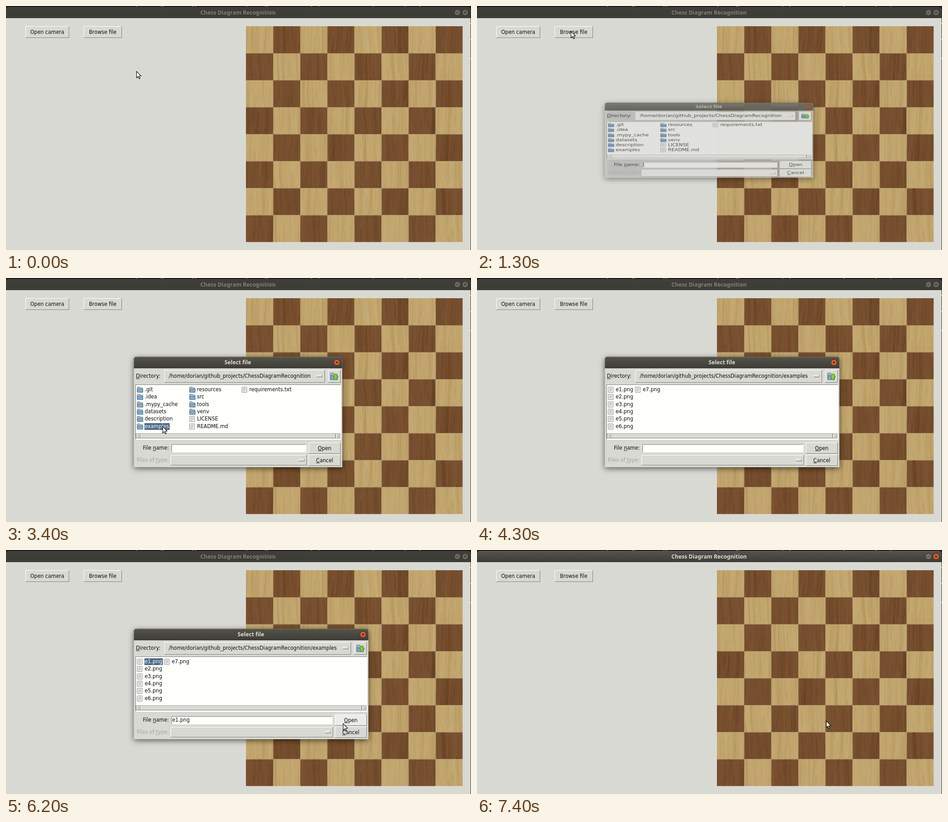
Write an HTML page with a canvas that moves like this. It is 1031 by 543 pixels and loops after 8000 ms.

```html
<!DOCTYPE html>
<html>
<head>
<meta charset="utf-8">
<style>
  html, body { margin: 0; width: 100%; height: 100%; overflow: hidden; background: #d9d9d4; }
  canvas { display: block; }
</style>
</head>
<body>
<canvas id="stage" width="1031" height="543"></canvas>
<script>
const stage = document.getElementById('stage');
const c = stage.getContext('2d');
const FACE = '#d9d9d4', HOVER = '#ececea', WHITE = '#fffffc', DARK = '#7f7f7a', INK = '#0c0c0c';
const TITLE = 'bold 12.2px "Noto Sans", sans-serif';

// Prefer the condensed face; without it a naturally narrow font is used
const CONDENSED = 'condensed 12.4px "DejaVu Sans Condensed", "DejaVu Sans", sans-serif';
c.font = CONDENSED;
const UI = c.measureText('Open camera').width < 79 ? CONDENSED : '11.8px "Noto Sans", sans-serif';

function rect(x, y, w, h, color) { c.fillStyle = color; c.fillRect(x, y, w, h); }

function label(text, x, y, { color = INK, align = 'left', font = UI, mark = -1 } = {}) {
  c.font = font;
  c.fillStyle = color;
  const width = s => c.measureText(s).width;
  if (align === 'center') x -= width(text) / 2;
  if (align === 'right') x -= width(text);
  c.fillText(text, x, y);
  if (mark >= 0) c.fillRect(x + width(text.slice(0, mark)), y + 1.5, width(text[mark]), 1);
}

function line(color, width, ...points) {
  c.strokeStyle = color;
  c.lineWidth = width;
  c.beginPath();
  points.forEach(([x, y]) => c.lineTo(x, y));
  c.stroke();
}

// Bevelled box: raised by default, sunken on request
function bevel(x, y, w, h, fill = FACE, sunken = false) {
  rect(x, y, w, h, sunken ? WHITE : DARK);
  rect(x, y, w - 1, h - 1, sunken ? DARK : WHITE);
  rect(x + 1, y + 1, w - 2, h - 2, fill);
}

function button(text, x, y, w, h, { hover, pressed, mark } = {}) {
  bevel(x, y, w, h, hover || pressed ? HOVER : FACE, pressed);
  const shift = pressed ? 1.5 : 0;
  label(text, x + w / 2 + shift, y + h / 2 + 4 + shift, { align: 'center', mark });
}

function titleBar(text, x, y, w, h, focused) {
  const shade = c.createLinearGradient(0, y, 0, y + h);
  shade.addColorStop(0, focused ? '#55544b' : '#3f4038');
  shade.addColorStop(1, focused ? '#3d3c36' : '#3b3c35');
  c.fillStyle = shade;
  c.beginPath();
  c.roundRect(x, y, w, h, [5, 5, 0, 0]);
  c.fill();
  if (focused) rect(x + 5, y, w - 10, 1, '#66655c');
  label(text, x + w / 2 - .5, y + h / 2 + 4, { color: focused ? '#dfdbd2' : '#827f78', align: 'center', font: TITLE });
}

function windowButton(x, y, fill, glyph, isClose) {
  c.beginPath();
  c.arc(x, y, 6.7, 0, 7);
  c.fillStyle = fill;
  c.fill();
  c.strokeStyle = '#2f2e2a';
  c.lineWidth = 1;
  c.stroke();
  if (isClose) {
    line(glyph, 1.3, [x - 2.3, y - 2.3], [x + 2.3, y + 2.3]);
    line(glyph, 1.3, [x + 2.3, y - 2.3], [x - 2.3, y + 2.3]);
  } else line(glyph, 1.3, [x - 3, y + .2], [x + 3, y + .2]);
}

function makeBoard() {
  const size = 60.06, board = new OffscreenCanvas(481, 481), g = board.getContext('2d');
  let seed = 11;
  const rnd = () => (seed = (seed * 16807) % 2147483647) / 2147483647;
  for (let row = 0; row < 8; row++) for (let col = 0; col < 8; col++) {
    const dark = (row + col) % 2, x = col * size, y = row * size;
    const tones = dark ? ['74,48,26', '140,98,62'] : ['160,128,74', '212,188,138'];
    const lean = (rnd() - .5) * 9, bend = (rnd() - .5) * 6;
    g.save();
    g.beginPath();
    g.rect(x, y, size, size);
    g.clip();
    g.fillStyle = dark ? '#78502f' : '#c2a66e';
    g.fillRect(x, y, 61, 61);
    for (let i = 0; i < 75; i++) {
      const broad = i < 7;
      const sx = x + rnd() * 66 - 3, len = broad ? 70 : 15 + rnd() * 50;
      const sy = broad ? y - 5 : y + rnd() * 80 - 20;
      g.strokeStyle = `rgba(${tones[rnd() < .52 ? 0 : 1]},${broad ? .13 : .08 + rnd() * .2})`;
      g.lineWidth = broad ? 3 + rnd() * 5 : .6 + rnd() * .8;
      g.beginPath();
      g.moveTo(sx, sy);
      g.quadraticCurveTo(sx + bend, sy + len / 2, sx + lean * len / 60, sy + len);
      g.stroke();
    }
    g.restore();
  }
  return board;
}
const board = makeBoard();

function drawMain(t, cursor) {
  const focused = t >= 1100 && t < 1300 || t >= 7300;
  rect(0, 0, 1031, 543, FACE);
  rect(0, 0, 1031, 8, '#2a0a22');
  for (const x of [288, 343, 347, 413, 419, 532, 574, 578, 676, 692, 813, 884, 916]) rect(x, 0, 3, 1, '#aaa2a8');
  titleBar('Chess Diagram Recognition', 0, 2, 1030, 25, focused);
  windowButton(1001, 14.5, focused ? '#77756b' : '#6b6a62', '#3b3a35', false);
  windowButton(1018, 14.5, focused ? '#e45b31' : '#6b6a62', focused ? '#51200f' : '#3b3a35', true);
  rect(1030, 8, 1, 535, '#33262f');
  for (const y of [38, 73, 116]) rect(1030, y, 1, 2, '#ddd');
  button('Open camera', 43, 45, 97, 26);
  button('Browse file', 172, 45, 85, 26, {
    hover: t < 1300 && cursor[0] < 257 && cursor[1] < 70,
    pressed: t >= 1100 && t < 1300
  });
  c.drawImage(board, 532.4, 45.3);
}

function folder(x, y) {
  c.fillStyle = '#77797a';
  c.beginPath();
  c.roundRect(x, y, 7, 6, 1.5);
  c.roundRect(x, y + 2, 13, 10, 1);
  c.fill();
  rect(x + 1, y + 1, 5, 2, '#b4b6b4');
  rect(x + 1, y + 3, 11, 2, '#c4c7c6');
  rect(x + .5, y + 4.5, 13, 8.5, '#41688f');
  rect(x + 1.5, y + 5.5, 11, 6.5, '#83a9cf');
}

function sheet(x, y) {
  c.fillStyle = '#8b8c88';
  c.beginPath();
  c.roundRect(x, y, 12, 13, 1.5);
  c.fill();
  rect(x + 1, y + 1, 10, 11, '#f2f2ef');
  for (let i = 0; i < 4; i++) rect(x + 3, y + 3 + i * 2, i === 3 ? 4 : 6, 1, '#a9aaa6');
}

function upButton(x, y) {
  bevel(x, y, 28, 28);
  c.save();
  c.translate(x + 5, y + 6);
  c.scale(1.2, 1.2);
  folder(0, 0);
  c.restore();
  c.beginPath();
  [[17, 8], [23, 15], [20, 15], [20, 21], [14, 21], [14, 15], [11, 15]].forEach(([px, py]) => c.lineTo(x + px, y + py));
  c.closePath();
  c.fillStyle = '#7fd635';
  c.fill();
  c.strokeStyle = '#397d10';
  c.lineWidth = 1;
  c.stroke();
}

function scrollArrow(x, dir) {
  bevel(x, 347, 9, 10);
  const mid = x + 4.5;
  line('#8e8e89', 1, [mid - dir * 1.5, 349], [mid + dir * 1.5, 352], [mid - dir * 1.5, 355]);
}

const rootFiles = '.git .idea .mypy_cache datasets description examples resources src tools venv LICENSE README.md requirements.txt'.split(' ');
const imageFiles = [1, 2, 3, 4, 5, 6, 7].map(n => `e${n}.png`);

function drawFiles(names, columnWidth, folders, selected) {
  names.forEach((name, i) => {
    const x = 290 + Math.floor(i / 6) * columnWidth, y = 248 + (i % 6) * 16.35;
    (i < folders ? folder : sheet)(x + .5, Math.round(y - 6));
    const on = name === selected;
    if (on) {
      c.font = UI;
      rect(x + 17, Math.round(y - 7), c.measureText(name).width + 2, 15, '#4a6984');
    }
    label(name, x + 17.5, y + 4, { color: on ? '#fff' : INK });
  });
}

function drawDialog(t, cursor) {
  const inExamples = t >= 4300, dx = inExamples ? 58 : 0;
  const picked = t >= 5500;
  const selected = !inExamples ? (t >= 3400 && 'examples') : (picked && t < 6800 && 'e1.png');
  const width = 462 + dx;

  c.save();
  c.shadowColor = 'rgba(0,0,0,.6)';
  c.shadowBlur = 13;
  c.shadowOffsetY = 3;
  c.fillStyle = FACE;
  c.beginPath();
  c.roundRect(283.5, 175.5, width, 245.5, [5, 5, 0, 0]);
  c.fill();
  c.restore();

  titleBar('Select file', 283.5, 175.5, width, 25.5, true);
  windowButton(733.5 + dx, 188, '#e45b31', '#51200f', true);

  label('Directory:', 288, 222, { mark: 0 });
  bevel(351, 205, 356 + dx, 28);
  label('/home/dorian/github_projects/ChessDiagramRecognition' + (inExamples ? '/examples' : ''), 361, 222);
  bevel(688 + dx, 216, 13, 5);
  upButton(714 + dx, 205);

  bevel(287, 237, 456 + dx, 123, WHITE, true);
  if (inExamples) drawFiles(imageFiles, 60, 0, selected);
  else drawFiles(rootFiles, 116, 10, selected);
  bevel(288, 346, 454 + dx, 12, '#c3c3be', true);
  scrollArrow(289, -1);
  scrollArrow(732 + dx, 1);
  bevel(298, 347, 433 + dx, 10);

  label('File name:', 361, 382, { align: 'right', mark: 5 });
  bevel(367, 370, 299 + dx, 18, WHITE, true);
  if (picked) label('e1.png', 368.5, 382);
  const caretOn = t < 3400 && (t < 1900 || t >= 2200 && t < 2800 || t >= 3100);
  if (caretOn) rect(369, 371, 1, 15, '#000');
  label('Files of type:', 361, 409, { align: 'right', mark: 9, color: '#a3a3a0' });
  bevel(365, 394, 302 + dx, 23);
  bevel(649 + dx, 403, 13, 5);

  const over = inExamples && cursor[0] > 729 && cursor[1] > 365;
  button('Open', 671 + dx, 366, 71, 25, { mark: 0, hover: over && cursor[1] < 391, pressed: t >= 6800 && t < 7000 });
  button('Cancel', 671 + dx, 393, 71, 25, { mark: 0, hover: over && cursor[1] >= 393 });
}

// Pointer way-points: time, x, y
const path = [
  [0, 289, 145], [500, 289, 145], [800, 217, 68], [900, 208, 56], [2000, 208, 56],
  [2300, 328, 285], [2400, 347, 315], [3000, 347, 315], [3200, 347, 330], [4700, 347, 330],
  [5100, 331, 258], [5300, 327, 244], [5600, 327, 244], [5700, 437, 287], [5800, 437, 287],
  [6000, 675, 372], [6200, 747, 386], [6700, 774, 380], [8000, 774, 380]
];

function pointerAt(t) {
  const i = path.findIndex(p => p[0] > t), [t0, x0, y0] = path[i - 1], [t1, x1, y1] = path[i];
  const k = (t - t0) / (t1 - t0);
  return [x0 + (x1 - x0) * k, y0 + (y1 - y0) * k];
}

function drawPointer([x, y]) {
  c.beginPath();
  [[.5, .5], [.5, 15], [3.8, 12], [6.2, 17], [8.4, 16], [6, 11.2], [10.4, 10.6]].forEach(([px, py]) => c.lineTo(x + px, y + py));
  c.closePath();
  c.fillStyle = '#fff';
  c.fill();
  c.strokeStyle = '#000';
  c.lineWidth = 1.1;
  c.stroke();
}

function frame(now) {
  const t = Math.floor(now % 8000 / 100) * 100;
  const cursor = pointerAt(t);
  drawMain(t, cursor);
  if (t >= 1300 && t < 7300) {
    const grow = t < 1500 || t >= 7200 ? .68 : 1;
    c.save();
    c.globalAlpha = grow;
    c.translate(0, 300 * (1 - grow));
    c.scale(1, grow);
    drawDialog(t, cursor);
    c.restore();
  }
  if (t < 4300 || t >= 4500) drawPointer(cursor);
  requestAnimationFrame(frame);
}
requestAnimationFrame(frame);
</script>
</body>
</html>
```
